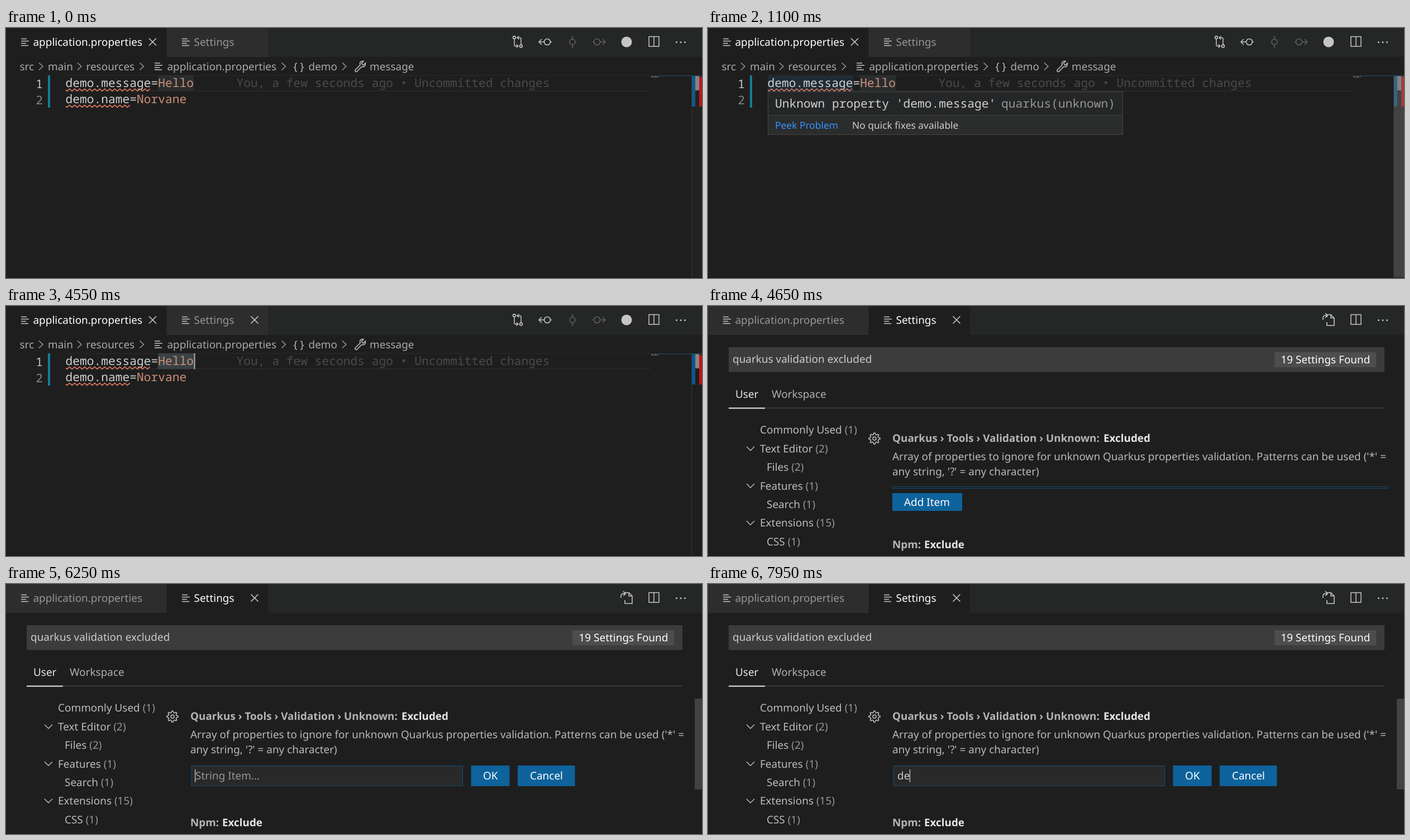
Write an HTML page that moves like this. It is 1246x449 px and loops after 8 s.

```html
<!DOCTYPE html>
<html lang="en">
<head>
<meta charset="utf-8">
<title>Editor and settings</title>
<style>
html, body { margin: 0; width: 100%; height: 100%; overflow: hidden; background: #1e1e1e; }
svg { display: block; width: 1246px; height: 449px; }
text { font: 18.95px "Noto Sans", sans-serif; text-rendering: geometricPrecision; white-space: pre; }
.mono { font: 21.25px "Noto Sans Mono", "DejaVu Sans Mono", monospace; }
.bold { font-size: 18.85px; font-weight: 700; }
.small { font-size: 17.4px; }
</style>
</head>
<body>
<svg id="stage" viewBox="0 0 1246 449"></svg>
<script>
const LOOP = 8000;

// Drawing helpers, each returns SVG markup
const rect = (x, y, w, h, fill, more = "") =>
  `<rect x="${x}" y="${y}" width="${w}" height="${h}" fill="${fill}" ${more}/>`;
const text = (x, y, str, fill, more = "") =>
  `<text x="${x}" y="${y}" fill="${fill}" ${more}>${str}</text>`;
const mono = (x, y, str, fill, more = "") => text(x, y, str, fill, `class="mono" ${more}`);
const line = (d, stroke = "#c5c5c5", width = 1.5, more = "") =>
  `<path d="${d}" fill="none" stroke="${stroke}" stroke-width="${width}" ${more}/>`;
const ring = (x, y, r, stroke = "#c5c5c5", width = 1.6) =>
  `<circle cx="${x}" cy="${y}" r="${r}" fill="none" stroke="${stroke}" stroke-width="${width}"/>`;
const disc = (x, y, r, fill = "#c5c5c5") => `<circle cx="${x}" cy="${y}" r="${r}" fill="${fill}"/>`;
const group = (id, ...parts) => `<g id="${id}">${parts.join("")}</g>`;

const fileIcon = (x, y) =>
  line(`M${x} ${y - 6}h10M${x} ${y - 2}h14M${x} ${y + 2}h9M${x} ${y + 6}h13`, "#c5c5c5", 1.6);
const cross = (x, y, id) =>
  line(`M${x - 6.5} ${y - 6.5}l13 13m0 -13l-13 13`, "#d0d0d0", 1.5, `id="${id}"`);
const chevronRight = x => line(`M${x - 3.5} 62.5l7 6.5l-7 6.5`, "#a0a0a0", 1.4);
const chevronDown = (x, y) => line(`M${x - 7} ${y - 3.5}l7 7l7 -7`, "#c0c0c0", 1.4);

// Zigzag underline: starts at mid height and goes down first
function squiggle(x0, x1, y) {
  const period = 9;
  let d = `M${x0} ${y}`;
  for (let x = x0 + period / 4, side = 1; x < x1; x += period / 2, side = -side) {
    d += `L${x} ${y + 2 * side}`;
  }
  return line(d, "#ec7f62", 1.5);
}

function gear(cx, cy) {
  let d = "";
  for (let i = 0; i < 32; i++) {
    const r = i % 4 < 2 ? 10 : 7.3;
    const a = (i - 0.5) * Math.PI / 16;
    d += `${i ? "L" : "M"}${(cx + r * Math.cos(a)).toFixed(1)} ${(cy + r * Math.sin(a)).toFixed(1)}`;
  }
  return line(d + "Z", "#c5c5c5", 1.5) + ring(cx, cy, 3, "#c5c5c5", 1.5);
}

const splitAndDots =
  line("M1151 15.5h18v17.6h-18zM1160 15.5v17.6", "#c5c5c5", 1.5) +
  [1200.5, 1208, 1215.5].map(x => disc(x, 25.5, 1.5)).join("");

function arrowIcon(x, dir, color) {
  return ring(x + 4 * dir, 25, 5.5, color) +
    line(`M${x - 1.5 * dir} 25H${x - 11 * dir}m${5 * dir} -5l${-5 * dir} 5l${5 * dir} 5M${x + 9.5 * dir} 25h${2.5 * dir}`, color, 1.5);
}

function tabs(first) {
  const color = on => on ? "#ffffff" : "#969696";
  const fill = on => on ? "#1e1e1e" : "#2d2d2d";
  return rect(0, 0, 1246, 52, "#252626") +
    rect(0, 0, 287, 52, fill(first)) + rect(288, 0, 181, 52, fill(!first)) +
    fileIcon(27, 25.5) + text(48.5, 32.3, "application.properties", color(first)) +
    fileIcon(315, 25.5) + text(336.5, 32.3, "Settings", color(!first));
}

const crumb = (x, str, id) => text(x, 75.6, str, "#a9a9a9", id ? `id="${id}"` : "");

const breadcrumbs =
  crumb(24.5, "src") + crumb(75, "main") + crumb(143.5, "resources", "crumbFolder") +
  fileIcon(266, 69) + crumb(288.5, "application.properties", "crumbFile") +
  text(514.5, 75.6, "{ }", "#b8b8b8") + crumb(541.5, "demo") +
  line("M625 75.5L634 66.5Q632 59 640 59.5L636.5 63.5L639.5 67L643.5 63Q644 71 636.5 69.5L628 78.5Q624.5 79 625 75.5Z", "#c5c5c5", 1.5) +
  crumb(651, "message") + [62.5, 131.5, 243, 497, 605.5].map(chevronRight).join("");

const ruler =
  rect(1227, 85, 1, 364, "#363636") +
  rect(1228, 86, 6, 55, "#0c568a") + rect(1234, 86, 7, 26, "#868686") + rect(1241, 88, 5, 53, "#c41212") +
  rect(1170, 85, 76, 1.5, "#24404f") +
  line("M1155 86.5h15M1155 88.5h13", "#777", 1, 'stroke-dasharray="4 1 6 1"');

const editor = group("editor",
  tabs(true), cross(262.5, 25, "closeFirst"), cross(445, 25, "closeHover"),
  line("M910 20v10.5q0 2 2 2h4.5m-3 -3l3.5 3l-3.5 3M922 30V19.5q0 -2 -2 -2h-4.5m3 -3l-3.5 3l3.5 3", "#c5c5c5", 1.5),
  ring(910, 17, 2.4), ring(922, 32.5, 2.4),
  arrowIcon(965, 1, "#c5c5c5"),
  ring(1014, 25, 5, "#5f5f5f"), line("M1014 14v6M1014 30v6", "#5f5f5f", 1.6),
  arrowIcon(1062, -1, "#5f5f5f"),
  disc(1111, 25, 9.5), splitAndDots, breadcrumbs,
  rect(107, 84.5, 1047, 1.5, "#282828"), rect(107, 112, 1047, 2, "#282828"),
  rect(75, 85, 4, 58, "#137d9b"),
  mono(66, 107.5, "1", "#c6c6c6", 'text-anchor="end"'),
  mono(66, 136.5, "2", "#858585", 'text-anchor="end"'),
  rect(107, 85, 153, 28, "#202c36", 'id="wordMark"'),
  rect(272, 85, 64, 28, "#2a2d2e", 'id="valueMark"'),
  mono(106.5, 106, 'demo.message=<tspan fill="#ce9178">Hello</tspan>', "#d0d0d0"),
  mono(412.5, 106, "You, a few seconds ago • Uncommitted changes", "#4a4a4a"),
  mono(106.5, 135, 'demo.name=<tspan fill="#ce9178">Norvane</tspan>', "#d0d0d0"),
  squiggle(107, 260, 111.2), squiggle(107, 222, 140.4),
  rect(336.5, 85, 2, 28.5, "#b8b8b8", 'id="editorCaret"'),
  ruler,
  rect(1228, 86, 18, 363, "#797979", 'id="editorSlider"'),
  group("popup",
    rect(107.5, 114.5, 635, 77, "#252627", 'stroke="#454545"'),
    rect(108, 157, 634, 34, "#2b2c2c"), rect(108, 156, 634, 1, "#3a3a3a"),
    mono(120, 143, "Unknown property 'demo.message'", "#d0d0d0"),
    mono(525, 143, "quarkus(unknown)", "#969696"),
    text(120, 181, "Peek Problem", "#3794ff", 'class="small"'),
    text(258, 181, "No quick fixes available", "#cccccc", 'class="small"'))
);

const tree = [
  [93, 222.5, "Commonly Used", 1],
  [93, 256, "Text Editor", 2, true],
  [105, 289.3, "Files", 2],
  [93, 322.7, "Features", 1, true],
  [105, 356, "Search", 1],
  [93, 389.4, "Extensions", 15, true],
  [105, 422.8, "CSS", 1]
].map(([x, y, name, count, open]) => group("row" + name.replace(" ", ""),
  open ? chevronDown(76, y) : "",
  text(x, y + 6.8, `${name} <tspan fill="#979797">(${count})</tspan>`, "#bcbcbc"))).join("");

const button = (x, y, w, h, label, tx, id) =>
  rect(x, y, w, h, "#0e639c", id ? `id="${id}"` : "") + text(tx, y + h / 2 + 6.6, label, "#ffffff");

const settings = group("settings",
  tabs(false), cross(445, 25, "closeSecond"),
  line("M1108 20v-4.5h7l6 6v13.5h-13v-6M1115 15.5v6h6M1101 25v-3q0 -5 5 -5h3m-4 -4l4 4l-4 4", "#c5c5c5", 1.6),
  splitAndDots,
  rect(37, 74, 1174, 44.5, "#3c3c3c"),
  text(44, 102, "quarkus validation excluded", "#cccccc"),
  rect(1014, 83, 182, 27, "#4d4d4d", 'rx="2"'),
  text(1025.5, 103, "19 Settings Found", "#ffffff"),
  text(49, 165, "User", "#e7e7e7"), text(114, 165, "Workspace", "#b0b0b0"),
  rect(37, 182.5, 1174, 1.5, "#424242"), rect(37, 182.5, 65, 2, "#e7e7e7"),
  tree, gear(298, 238),
  text(330, 244, "Quarkus › Tools › Validation › Unknown:", "#b5b5b5", 'class="bold"'),
  text(708, 244, "Excluded", "#e7e7e7", 'class="bold"'),
  text(330, 276.5, "Array of properties to ignore for unknown Quarkus properties validation. Patterns can be used ('*' =", "#b9b9b9"),
  text(330, 304, "any string, '?' = any character)", "#b9b9b9"),
  text(330, 434.5, "Npm:", "#b5b5b5", 'class="bold"'),
  text(387, 434.5, "Exclude", "#e7e7e7", 'class="bold"'),
  group("addItem",
    rect(330.5, 324.5, 886, 3, "none", 'stroke="#114a72"'),
    button(330, 336, 125, 32, "Add Item", 351, "addButton")),
  group("form",
    rect(332, 326.5, 485.5, 36, "#292929", 'stroke="#0f5180"'),
    text(339, 351, "", "#cccccc", 'id="entry"'),
    rect(338, 333, 1.3, 23, "#c8c8c8", 'id="entryCaret"'),
    button(832.5, 326, 69, 37, "OK", 854),
    button(916, 326, 102.5, 37, "Cancel", 938)),
  rect(1233, 206, 13, 163, "#424242", 'id="listSlider"')
);

document.getElementById("stage").innerHTML =
  rect(0, 0, 1246, 449, "#1e1e1e") + editor + settings + rect(0, 448, 1246, 1, "#141414");

const el = {};
document.querySelectorAll("[id]").forEach(node => { el[node.id] = node; });

const clamp = v => Math.max(0, Math.min(1, v));
const ramp = (t, from, to) => clamp((t - from) / (to - from));
const within = (t, from, to) => t >= from && t < to;
const show = (id, on) => el[id].setAttribute("opacity", Number(on));
const paint = (id, color) => el[id].setAttribute("fill", color);

function render(t) {
  const inSettings = t >= 4600;
  el.editor.style.display = inSettings ? "none" : "";
  el.settings.style.display = inSettings ? "" : "none";

  const slider = t < 600 ? clamp((100 - t) / 800)
    : t < 3450 ? ramp(t, 650, 800) : 1 - ramp(t, 3450, 4250);
  show("editorSlider", 0.4 * slider);
  paint("crumbFolder", within(t, 600, 700) ? "#e0e0e0" : "#a9a9a9");
  paint("crumbFile", within(t, 3450, 3550) ? "#e0e0e0" : "#a9a9a9");
  show("closeHover", t >= 3600);
  show("wordMark", within(t, 1050, 3450));
  show("popup", within(t, 1050, 3450) ? 0.5 + 0.5 * ramp(t, 1050, 1100) : 0);
  paint("valueMark", t >= 4500 ? "#394144" : "#2a2d2e");
  show("editorCaret", t >= 4500);

  const editing = t >= 6150;
  show("addItem", !editing);
  show("form", editing);
  paint("addButton", t >= 5550 ? "#1177bb" : "#0e639c");
  el.rowExtensions.style.filter = within(t, 6550, 6700) ? "brightness(1.2)" : "";

  const typed = t >= 7950 ? "de" : t >= 7900 ? "d" : "";
  el.entry.textContent = typed || "String Item...";
  paint("entry", typed ? "#cccccc" : "#989898");
  el.entryCaret.setAttribute("x", typed ? 338.5 + el.entry.getComputedTextLength() : 338);
  show("entryCaret", within(t, 6250, 6800) || within(t, 7300, 7750) || t >= 7900);
  show("listSlider", ramp(t, 4800, 4950));
  paint("listSlider", within(t, 7300, 7700) ? "#4f4f4f" : "#424242");
}

const start = performance.now();
function tick() {
  render((performance.now() - start) % LOOP);
  requestAnimationFrame(tick);
}
render(0);
requestAnimationFrame(tick);
</script>
</body>
</html>
```
